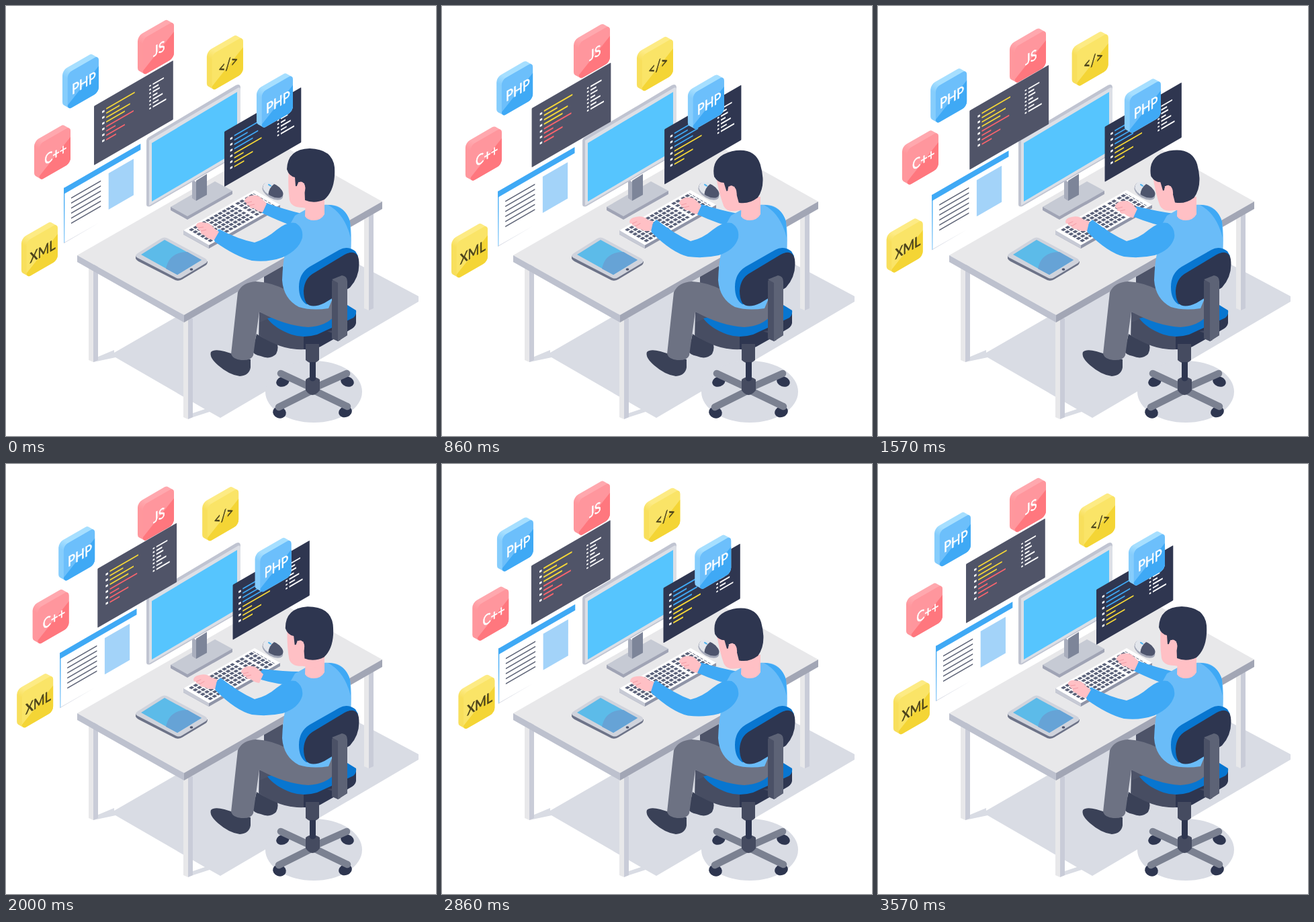
An HTML page that plays this animation: 640 px wide and 640 px high, repeating every 3640 ms.

```html
<!DOCTYPE html>
<html lang="en">
<head>
<meta charset="utf-8">
<title>Programmer at work</title>
<style>
html, body { margin: 0; width: 100%; height: 100%; overflow: hidden; background: #fff; }
svg { display: block; width: 100vw; height: 100vh; }
text { font: 21px Lato, "Open Sans", sans-serif; text-anchor: middle; stroke-width: .6; }
</style>
</head>
<body>
<svg viewBox="0 0 640 640">
  <defs id="defs">
    <linearGradient id="edge" x1="0" y1="0" x2="0" y2="1">
      <stop offset=".3" stop-color="#3fa9f5"/><stop offset="1" stop-color="#3fa9f5" stop-opacity=".55"/>
    </linearGradient>
    <linearGradient id="base" x1="0" y1="0" x2="1" y2="0">
      <stop offset="0" stop-color="#c4c8d6"/><stop offset=".6" stop-color="#c4c8d6" stop-opacity="0"/>
    </linearGradient>
    <clipPath id="front"><rect width="53.7" height="55" rx="7.5"/></clipPath>
  </defs>

  <!-- floor -->
  <g fill="#d9dce4">
    <path d="M161 516L300 436 460 350 614 432V440L319 613 303 604 272 614V608L296 600 163 523 130 530V525L161 512Z"/>
    <ellipse cx="458" cy="574" rx="72" ry="46"/>
  </g>

  <!-- desk -->
  <g fill="#e8e8ea">
    <path d="M123 385H130V530L123 527ZM533 305H540V453L533 450Z"/>
    <path fill="#c9ccd8" d="M130 385H137V527L130 530ZM540 305H547V450L540 453Z"/>
    <path d="M264 465H271V615L264 612Z"/>
    <path fill="#c9ccd8" d="M271 465H278V612L271 615Z"/>
    <path d="M106 371L401 202 560 291 265 460Z"/>
    <path fill="#bdc1ce" d="M106 371L265 460V471L106 381Z"/>
    <path fill="#a2a6b5" d="M265 460L560 291V302L265 471Z"/>
  </g>

  <!-- tablet -->
  <path fill="#6d7388" d="M193 372V376Q194 378 197 380L252 408Q257 410 262 407L297 386Q300 384 300 380Z"/>
  <path fill="#d0d3dc" d="M196 368L231 346Q236 343 241 346L297 376Q302 380 297 383L262 404Q257 407 252 404L196 375Q190 372 196 368Z"/>
  <path fill="#5cbbe9" d="M201 370L236 348 291 378 255 400Z"/>
  <path fill="#66a3d6" d="M238 391Q243 366 270 366L291 378 255 400Z"/>
  <ellipse cx="276" cy="392" rx="2.4" ry="1.7" fill="#4e556d"/>

  <!-- monitor -->
  <path fill="#a0a4b5" d="M245 299V304L270 318 337 280V275Z"/>
  <path fill="#c6cad4" d="M245 299L311 261 337 275 270 313Z"/>
  <path fill="#a9aebd" d="M277 258L283 262V290L277 286Z"/>
  <path fill="#7d8599" d="M283 260L299 250V281L283 290Z"/>
  <path fill="#c0c4d1" d="M209 201Q209 197 213 195L342 118Q349 115 349 122V218Q349 220 347 221L215 298Q209 300 209 295Z"/>
  <path fill="#dcdfe6" d="M213 200L345 122Q349 120 349 124V218L213 297Z"/>
  <path fill="#56c5fe" d="M217 204L344 128V216L217 291Z"/>

  <!-- mouse -->
  <g transform="rotate(30 397 275)">
    <ellipse cx="398" cy="277" rx="17" ry="9" fill="#a3a8b8"/>
    <ellipse cx="397" cy="274" rx="16.5" ry="9" fill="#4e556d"/>
    <path fill="#e3e6ec" d="M394 265Q381 265 380.500 274 381 282 394 283 390 274 394 265Z"/>
    <ellipse cx="389" cy="270" rx="3" ry="1.2" fill="#56b6f0"/>
  </g>

  <!-- keyboard -->
  <path fill="#8f94a7" d="M264 334V340L302 361 408 301V296Z"/>
  <path fill="#c7cad5" d="M264 334V340L302 361V356Z"/>
  <path fill="#fff" d="M264 334L370 274 408 296 302 356Z"/>
  <g id="keys" transform="matrix(1 -.566 1 .579 264 334)" stroke="#5a6179" stroke-width="3.8" fill="none"/>

  <g id="panels"></g>

  <!-- legs -->
  <path fill="#4d5368" d="M384 403L412 387 425 440 384 418ZM377 455L400 464V499L376 495Z"/>
  <path fill="#3a4157" d="M373 488Q388 500 400 497 408 506 402 518 393 527 379 521 368 519 367 513Z"/>
  <path fill="#3a4157" d="M305 515Q310 510 325 514L364 526V538Q362 550 348 551 332 549 316 535 302 523 305 515Z"/>

  <!-- seat -->
  <path fill="#474d62" d="M389 466L377 471V488Q382 496 408 506 425 512 445 511L470 480Z"/>
  <path fill="#2e3650" d="M443 489Q480 487 521 457V472Q520 478 512 482L468 507Q458 512 443 511Z"/>
  <path fill="#0876d0" d="M389 465Q400 480 425 489 443 495 463 489L517 464Q522 460 521 453L500 440 430 455Z"/>

  <path fill="#6d7283" d="M345 426Q352 411 372 410 395 411 420 424L490 440V460Q478 476 450 478 415 476 377 455L368 520Q365 528 350 527 338 526 335 518Z"/>

  <!-- body -->
  <path id="farArm" fill="#3fa9f5"/>
  <path fill="#6abcf8" d="M446 303Q462 294 484 296 505 298 512 321 515 340 513 372L480 450Q455 454 436 448 413 436 411 408 412 380 416 365L420 330 430 312Z"/>
  <path fill="#3fa9f5" d="M479 296Q505 297 512 321L513 345Q504 309 479 296Z"/>
  <path fill="#ffc0c5" d="M446 284H474V310Q469 319 458 319 449 319 445 313Z"/>

  <!-- chair -->
  <path fill="#0876d0" d="M436 418Q436 398 452 388L496 363Q508 356 520 365L524 372 470 440 447 444Q436 437 436 418Z"/>
  <path fill="#2e3650" d="M443 424Q444 405 459 397L504 370Q522 361 525 377 528 401 512 419L474 442Q455 451 447 442 443 435 443 424Z"/>
  <path fill="#434960" d="M478 484L486 487 494 499 508 490V480Z"/>
  <path fill="#4b5166" d="M485 409L495 403 498 497 494 499 485 495Z"/>
  <path fill="#5d6376" d="M485 407L500 401Q508 402 508 410V490L494 499V412Z"/>
  <path fill="#454b60" d="M446 503H466V527Q456 536 446 527Z"/>
  <path fill="#2e3650" d="M452 530H461V562H452Z"/>
  <g fill="#2e3650">
    <ellipse cx="412" cy="559" rx="10" ry="7.500" transform="rotate(-20 412 559)"/>
    <ellipse cx="508" cy="559" rx="10" ry="7.500" transform="rotate(20 508 559)"/>
    <ellipse cx="407" cy="605" rx="10" ry="8.500" transform="rotate(20 407 605)"/>
    <ellipse cx="505" cy="604" rx="10" ry="8" transform="rotate(-20 505 604)"/>
  </g>
  <path fill="none" stroke="#7b8191" stroke-width="10.5" stroke-linecap="round" d="M409 547L452 567M507 547L462 567M406 597L454 573M508 596L460 573"/>
  <path fill="#454b60" d="M446 556Q456 548 467 556V572Q456 586 446 572Z"/>
  <path fill="#2e3650" d="M452 540H461V556Q456 561 452 556Z"/>

  <!-- hands, near arm -->
  <g id="farHand">
    <path fill="#ffc0c5" d="M355 289Q358 283 366 282 376 281 381 287L388 294 382 307Q374 306 369 301 362 302 362 297 356 297 358 293 354 292 355 289Z"/>
    <path fill="none" stroke="#f29ca5" d="M358 293L366 291M362 297L370 295"/>
  </g>
  <path id="nearArm" fill="#3fa9f5"/>
  <g id="nearHand">
    <path fill="#ffc0c5" d="M283 326Q285 321 294 322 305 323 310 331L317 336 310 348Q299 347 295 341 288 339 290 335 284 333 286 330 282 329 283 326Z"/>
    <path fill="none" stroke="#f29ca5" d="M286 330L294 329M290 335L298 333"/>
  </g>

  <!-- head -->
  <g id="head">
    <path fill="#ffc0c5" d="M421 240Q419 268 422 289 425 300 441 300L474 305V250Z"/>
    <path fill="#2e3650" d="M418 243Q419 213 452 212 486 213 489 240 491 273 474 288 459 295 445 289L444 264 435 262Q435 269 431 268L430 255Q421 253 418 243Z"/>
    <path fill="#ffc0c5" d="M433 268Q435 260 441 262 447 266 445 275 443 283 437 280 432 276 433 268Z"/>
  </g>

  <g id="icons"></g>
</svg>

<script>
const $ = id => document.getElementById(id);
const line = (x, y, w) => `M${x} ${y}h${w}`;
const rows = (n, f) => Array.from({ length: n }, (_, i) => f(i)).join('');

// keyboard
$('keys').innerHTML = rows(6, i => {
  const y = 5 + i * 5.6;
  return `<path stroke-dasharray="4.400 1.700" d="${line(5, y, 65)}${line(74, y, 11)}${line(88, y, 13)}"/>`;
});

// floating panels, drawn in isometric space
const lens = [49, 23, 41, 32, 47, 16, 32, 17];
const side = [19, 10, 12, 8, 17, 10, 23];
const codePanel = p => `
  <rect width="${p.w}" height="${p.h}" rx="1" fill="${p.fill}"/>
  <g fill="none" stroke-width="2.200">
    <path stroke="#fff" stroke-width="3" d="${rows(6, i => line(p.bx, 16 + i * 8.7, 4))}"/>
    <path stroke="${p.c1}" d="${rows(4, i => line(p.bx + 7, 14.5 + i * 6.5, lens[i]))}"/>
    <path stroke="${p.c2}" d="${rows(4, i => line(p.bx + 7, 41 + i * 6.5, lens[i + 4]))}"/>
    <path stroke="#fff" d="${rows(7, i => line(p.sx, 18 + i * 5.6, 3) + line(p.sx + 6, 18 + i * 5.6, side[i]))}"/>
  </g>`;
const page = () => `
  <rect width="132" height="82" fill="#fff"/>
  <rect width="1.500" height="82" fill="url(#edge)"/>
  <rect y="81.400" width="100" height=".8" fill="url(#base)"/>
  <rect width="132" height="9" fill="#3fa9f5"/>
  <path stroke="#5f6578" stroke-width="1.700" d="${rows(6, i => line(12.7, 21.3 + i * 7.5, 51))}"/>
  <rect x="77" y="16.500" width="43" height="54" fill="#a3d3f9"/>`;

const panels = [
  { x: 86, y: 271, dx: -6, dy: 10.5, art: page },
  { x: 131, y: 149, dx: 5.5, dy: 7, w: 136, h: 88, fill: '#505468', c1: '#f5d737', c2: '#f9646c', bx: 14, sx: 95, art: codePanel },
  { x: 325, y: 187, dx: 13, dy: -7.5, w: 132, h: 82, fill: '#2f3650', c1: '#3fa9f5', c2: '#f5d737', bx: 10, sx: 91, art: codePanel }
];

// floating icons: [left side, top, face, lower face, label]
const tones = {
  blue: ['#86cdfc', '#a6dfff', '#6cbffb', '#3fa9f5', '#fff'],
  pink: ['#ff979d', '#ffa8ae', '#ff969d', '#ff777e', '#fff'],
  gold: ['#f8df5c', '#fdeb84', '#fae467', '#f4d535', '#4a421b']
};
const bob = (dx, dy) => a => [dx * (1 - Math.cos(a)) / 2, dy * (1 - Math.cos(a)) / 2];
const orbit = (rx, p, ry, q) => a => [rx * Math.cos(a + p), ry * Math.cos(a + q)];
const small = orbit(5.5, 1.16, -5, -.44), large = orbit(6.5, .83, 7, -.96);
const icons = [
  { label: 'PHP', tone: 'blue', x: 84, y: 72, move: bob(-6, 22) },
  { label: 'JS', tone: 'pink', x: 196, y: 21, move: bob(0, 13) },
  { label: 'C++', tone: 'pink', x: 39.8, y: 182, move: small },
  { label: 'XML', tone: 'gold', x: 18.5, y: 318, move: large },
  { label: '&lt;/&gt;', tone: 'gold', x: 294.5, y: 40, move: large },
  { label: 'PHP', tone: 'blue', x: 370.8, y: 105, move: small }
];

for (const [name, t] of Object.entries(tones)) {
  $('defs').insertAdjacentHTML('beforeend', `
    <linearGradient id="${name}" gradientUnits="userSpaceOnUse" x1="-4" y1="4" x2="4" y2="-4">
      <stop offset="0" stop-color="${t[0]}"/><stop offset="1" stop-color="${t[1]}"/>
    </linearGradient>`);
}
const iconArt = ({ label, tone }) => {
  const [, , face, low, ink] = tones[tone];
  return `
    <path d="M-1.200 -1H37.500L46.200 7.500V47.500H7.500L-1.200 39Z" fill="url(#${tone})" stroke="url(#${tone})" stroke-width="15" stroke-linejoin="round"/>
    <g clip-path="url(#front)">
      <path fill="${face}" d="M0 0H54V55H0Z"/>
      <path fill="${low}" d="M0 48L54 16V55H0Z"/>
    </g>
    <text x="28" y="36" fill="${ink}" stroke="${ink}">${label}</text>`;
};

const iso = (x, y) => `matrix(.866 -.5 0 1 ${x} ${y})`;
const add = (id, item, art) => {
  const g = document.createElementNS('http://www.w3.org/2000/svg', 'g');
  g.innerHTML = art;
  $(id).append(g);
  item.el = g;
};
panels.forEach(p => {
  add('panels', p, p.art(p));
  p.move = bob(p.dx, p.dy);
});
icons.forEach(i => add('icons', i, iconArt(i)));

// eased value at step k from [step, value] pairs
const ease = (keys, k) => {
  const i = keys.findIndex(e => e[0] >= k);
  if (i < 1) return keys[i < 0 ? keys.length - 1 : 0][1];
  const [a, u] = keys[i - 1], [b, v] = keys[i];
  const p = (k - a) / (b - a);
  return u + (v - u) * p * p * (3 - 2 * p);
};
const nod = [[0, 0], [11, 13], [20, 13], [30.7, 0], [35.5, 0], [41, 13], [43.6, 13], [50, 0]];
const lift = [[0, 0], [6, 1], [38, 1], [44, 0], [50, 0]];
const handX = [[0, 0], [7, -4], [17, 0], [28, -5], [35, 0], [45, -4], [50, 0]];
const handY = [[0, 0], [7, 6], [17, 0], [28, 19], [35, 2], [45, 6], [50, 0]];

const LOOP = 3640, STEPS = 51;

function draw() {
  const t = performance.now() % LOOP;
  const k = Math.floor((t + 5) / (LOOP / STEPS)) % STEPS;
  const a = k / 50 * Math.PI * 2;

  for (const p of panels) {
    const [dx, dy] = p.move(a);
    p.el.setAttribute('transform', iso(p.x + dx, p.y + dy));
  }
  for (const i of icons) {
    const [dx, dy] = i.move(a);
    i.el.setAttribute('transform', iso(i.x + dx + 7.5, i.y + dy + 28));
  }

  $('head').setAttribute('transform', `rotate(${-ease(nod, k)} 460 305)`);

  const p = ease(lift, k);
  $('nearHand').setAttribute('transform', `translate(${-4 * p} ${-5 * p}) rotate(${-17 * p} 283 326)`);
  const cx = 2 * p, cy = -14 * p, e = -6 * p;
  $('nearArm').setAttribute('d', `M${317 + cx} ${332 + cy}Q${345 + cx} ${347 + cy / 2} 370 ${352 + e / 3}
    Q388 346 403 333 419 320 431 323 443 330 441 345 436 363 412 ${374 + e / 2}
    Q390 ${382 + e} 366 ${379 + e} 342 ${373 + e} ${311 + cx / 2} ${351 + cy}
    Q${306 + cx} ${342 + cy} ${317 + cx} ${332 + cy}Z`);

  const hx = ease(handX, k), hy = ease(handY, k);
  $('farHand').setAttribute('transform', `translate(${hx} ${hy})`);
  const fx = hx * .8, fy = hy * .65;
  $('farArm').setAttribute('d', `M${387 + fx} ${293 + fy}Q415 ${303 + fy / 2} 440 309L436 330
    Q${414 + fx} ${324 + fy / 2} ${381 + fx} ${308 + fy}Q${378 + fx} ${299 + fy} ${387 + fx} ${293 + fy}Z`);

  requestAnimationFrame(draw);
}
draw();
</script>
</body>
</html>
```
